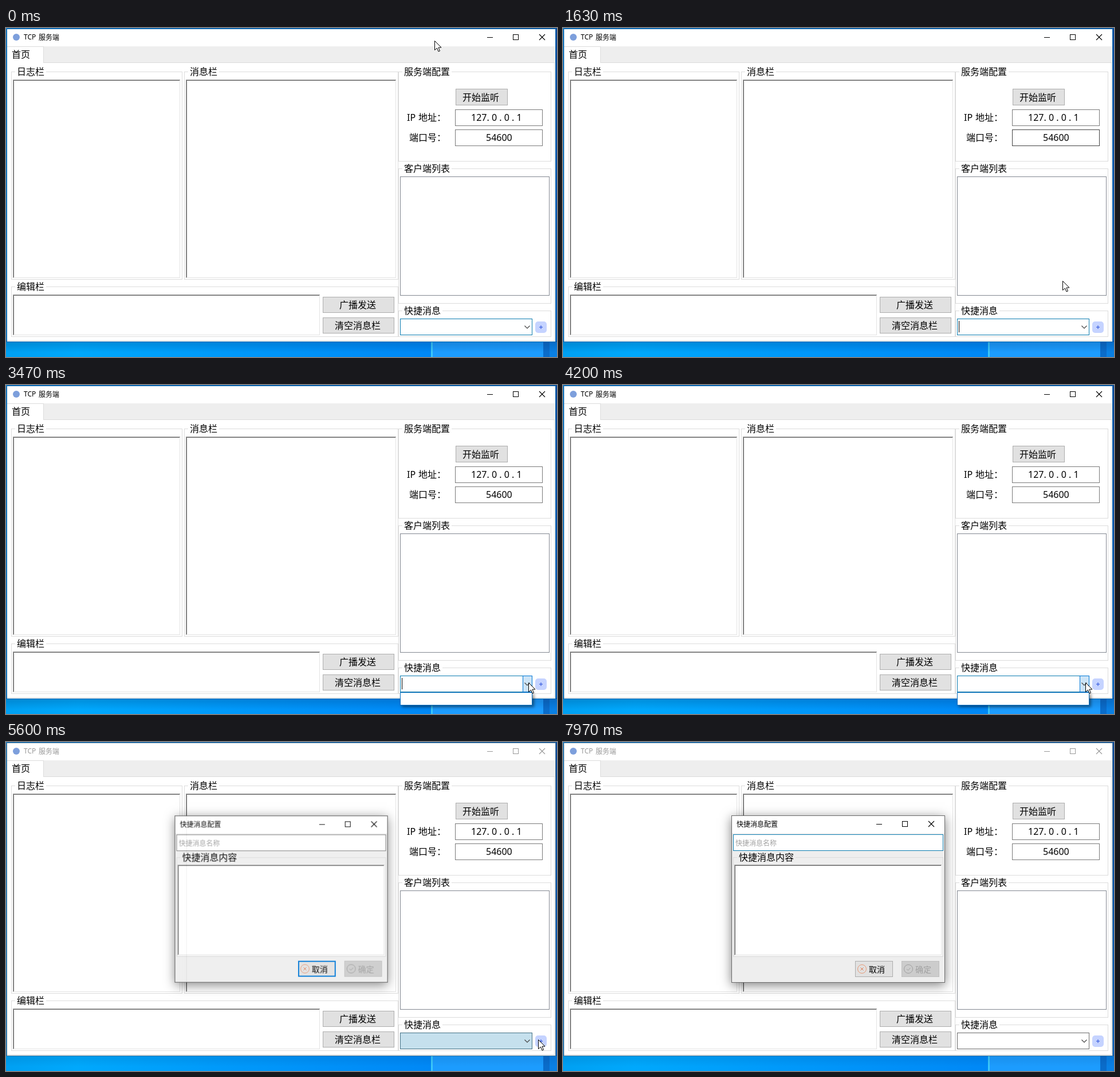
Recreate the animation shown at these times as an HTML page with a canvas. Size 962x574 px, loop 8000 ms.

```html
<!DOCTYPE html>
<html lang="zh-CN">
<head>
<meta charset="utf-8">
<title>TCP 服务端</title>
<style>
html, body { margin: 0; width: 100%; height: 100%; overflow: hidden; background: #fff; }
canvas { display: block; width: 100vw; height: 100vh; }
</style>
</head>
<body>
<canvas id="stage" width="962" height="574"></canvas>
<script>
const W = 962, H = 574, LOOP = 8000;
const FONT = '"Noto Sans", "Noto Sans CJK SC", "Noto Sans CJK", sans-serif';
const BLUE = '#0078d7', FOCUS = '#0b7cb0', LINE = '#dcdcdc';
const screen = document.getElementById('stage').getContext('2d');
const layer = document.createElement('canvas');
layer.width = W;
layer.height = H;
const layerCtx = layer.getContext('2d');
let c = screen;

// Key moments in ms
const DROP_OPEN = 2750, DROP_CLOSE = 4250, LEAVE_COMBO = 4800;
const INACTIVE = 5450, DIALOG = 5470, FIELD_CLICK = 7100;

// Pointer path: time, x, y
const PATH = [
  [0, 748, 22], [650, 748, 22], [1050, 772, 118], [1400, 848, 190],
  [1600, 872, 441], [1750, 872, 441], [2350, 912, 519], [4500, 912, 519],
  [4900, 928, 519], [5300, 929, 519], [5950, 929, 519], [6800, 608, 178],
  [LOOP, 608, 178]
];

const clamp = v => Math.max(0, Math.min(1, v));
const ease = v => v * v * (3 - 2 * v);
const mix = (a, b, k) => a + (b - a) * k;
const gray = v => `rgb(${v},${v},${v})`;

function pointer(t) {
  let i = 0;
  while (i < PATH.length - 2 && t >= PATH[i + 1][0]) i++;
  const [t0, x0, y0] = PATH[i], [t1, x1, y1] = PATH[i + 1];
  const k = ease(clamp((t - t0) / (t1 - t0)));
  return { x: Math.round(mix(x0, x1, k)), y: Math.round(mix(y0, y1, k)) };
}

const inside = (p, x, y, w, h) => p.x >= x && p.x < x + w && p.y >= y && p.y < y + h;

function fill(x, y, w, h, color) {
  c.fillStyle = color;
  c.fillRect(x, y, w, h);
}

function box(x, y, w, h, border, inner, thick = 1) {
  fill(x, y, w, h, border);
  fill(x + thick, y + thick, w - 2 * thick, h - 2 * thick, inner);
}

// Linear gradient from [offset, colour] stops
function blend(x0, y0, x1, y1, stops) {
  const g = c.createLinearGradient(x0, y0, x1, y1);
  stops.forEach(([at, color]) => g.addColorStop(at, color));
  return g;
}

// Text placed by the middle of its line
function text(s, x, mid, size = 16, color = '#000') {
  c.font = `${size}px ${FONT}`;
  c.fillStyle = color;
  c.fillText(s, x, Math.round(mid + size * 0.36));
}

function path(points, color, width = 1) {
  c.beginPath();
  points.forEach(([x, y]) => c.lineTo(x, y));
  c.strokeStyle = color;
  c.lineWidth = width;
  c.stroke();
}

function circle(x, y, r) {
  c.beginPath();
  c.arc(x, y, r, 0, 7);
}

function group(x, y, w, h, label, labelX, back = '#fff') {
  c.strokeStyle = LINE;
  c.lineWidth = 1;
  c.strokeRect(x + 0.5, y + 0.5, w - 1, h - 1);
  fill(labelX - 3, y, label.length * 16 + 6, 1, back);
  text(label, labelX, y + 0.5);
}

function sunken(x, y, w, h) {
  fill(x, y, w, h, '#fff');
  fill(x, y, w - 1, 1, '#a0a0a0');
  fill(x, y, 1, h - 1, '#a0a0a0');
  fill(x + 1, y + 1, w - 2, 1, '#696969');
  fill(x + 1, y + 1, 1, h - 2, '#696969');
  fill(x + 1, y + h - 2, w - 2, 1, '#e3e3e3');
  fill(x + w - 2, y + 1, 1, h - 2, '#e3e3e3');
}

function button(x, y, w, h, label, labelX) {
  box(x, y, w, h, '#adadad', '#e1e1e1');
  text(label, labelX, y + h / 2 + 0.5);
}

function captionButtons(x, y, color) {
  fill(x, y, 10, 1, color);
  c.strokeStyle = color;
  c.lineWidth = 1;
  c.strokeRect(x + 45.5, y - 4.5, 9, 9);
  path([[x + 91, y - 5], [x + 101, y + 5]], color, 1.1);
  path([[x + 101, y - 5], [x + 91, y + 5]], color, 1.1);
}

function desktop(active) {
  fill(0, 0, W, H, blend(0, 0, W, 0, [
    [0, '#00a0f2'], [0.13, '#00a8fc'], [0.4, '#0099fa'], [0.77, '#0088f6']
  ]));
  fill(0, 0, W, 3, blend(0, 0, W, 0, [[0, '#0a6ab8'], [1, '#084a94']]));
  fill(0, 0, 2, 548, '#1c7cc4');
  fill(744, 546, 194, 28, '#1c9cfe');
  fill(938, 546, 11, 28, '#0a6cca');
  fill(949, 546, 13, 28, '#0a80e4');
  fill(959, 0, 3, 548, blend(0, 0, 0, 548, [[0, '#0a4a9c'], [1, '#0a64c0']]));
  fill(742, 546, 3, 28, '#3cc8fa');
  fill(0, 546, W, 20, blend(0, 546, 0, 566, [
    [0, `rgba(0,20,60,${active ? 0.2 : 0.1})`], [1, 'rgba(0,20,60,0)']
  ]));
}

function combo(t, p, active) {
  box(688, 507, 231, 29, '#6a6a6a', '#fff');
  c.globalAlpha = clamp((INACTIVE + 250 - t) / 250);
  box(688, 507, 231, 29, FOCUS, '#fff');
  c.globalAlpha = 1;
  const over = active && inside(p, 902, 507, 17, 29);
  const glow = over ? 1 : active && t > LEAVE_COMBO - 200 ? clamp((5150 - t) / 350) : 0;
  if (glow) {
    c.globalAlpha = glow;
    box(902, 507, 17, 29, BLUE, over ? '#cce4f7' : '#f4f9fd');
    c.globalAlpha = 1;
  }
  path([[905.5, 519.5], [910, 524], [914.5, 519.5]], '#444', 1.2);
  if (active && t >= 250 && (t - 250) % 1060 < 530) fill(691, 511, 1, 20, '#000');
}

function plusButton(t, p) {
  const hover = t < INACTIVE && inside(p, 924, 512, 20, 20);
  c.beginPath();
  c.roundRect(924, 512, 20, 20, 5);
  c.fillStyle = hover ? '#8298ee' : '#c5d3ff';
  c.fill();
  fill(931, 521.25, 6, 1.5, '#5272e4');
  fill(933.25, 519, 1.5, 6, '#5272e4');
}

function dropdown() {
  c.save();
  c.shadowColor = 'rgba(0,0,0,.45)';
  c.shadowBlur = 5;
  c.shadowOffsetX = c.shadowOffsetY = 3;
  fill(688, 536, 231, 23, '#fff');
  c.restore();
  box(688, 536, 231, 23, '#0a70c0', '#fff');
}

function mainWindow(t, p) {
  const active = t < INACTIVE;
  const ink = active ? '#000' : '#999';
  desktop(active);
  box(1, 1, 959, 547, active ? '#0a68b0' : '#4a7896', '#fff');

  circle(18, 16, 6);
  c.fillStyle = '#7d9fdc';
  c.fill();
  text('TCP', 31, 16, 12, ink);
  text('服务端', 57, 16.5, 12, ink);
  captionButtons(840, 16, ink);

  fill(2, 32, 957, 29, '#eee');
  fill(2, 32, 64, 29, '#fff');
  fill(2, 32, 64, 1, LINE);
  fill(65, 32, 1, 29, LINE);
  fill(66, 60, 892, 1, LINE);
  fill(957, 60, 1, 486, LINE);
  fill(2, 545, 956, 1, LINE);
  text('首页', 10, 46);

  group(9, 76, 299, 363, '日志栏', 19);
  sunken(12, 90, 293, 347);
  group(311, 76, 374, 363, '消息栏', 321);
  sunken(314, 90, 368, 347);
  group(9, 451, 676, 88, '编辑栏', 19);
  sunken(12, 465, 537, 72);
  button(553, 469, 125, 28, '广播发送', 582);
  button(553, 505, 125, 28, '清空消息栏', 574);

  group(685, 76, 267, 157, '服务端配置', 695);
  button(785, 106, 91, 29, '开始监听', 797);
  const ipHover = inside(p, 784, 142, 153, 29);
  const portHover = inside(p, 784, 177, 153, 29);
  const fade = t > 1350 && t < 2000 ? clamp((1900 - t) / 400) : 0;
  box(784, 142, 153, 29, ipHover ? '#333' : '#7a7a7a', '#fff');
  box(784, 177, 153, 29, portHover ? '#222' : gray(Math.round(mix(122, 40, fade))), '#fff');
  text('IP', 700, 156.5);
  text('地址：', 720, 156.5);
  text('端口号：', 704, 191.5);
  text('127. 0 . 0 . 1', 812, 156.5);
  text('54600', 838, 191.5);

  group(685, 245, 267, 236, '客户端列表', 695);
  box(688, 259, 261, 208, '#828790', '#fff');
  group(685, 493, 267, 46, '快捷消息', 695);
  combo(t, p, active);
  plusButton(t, p);
  if (t >= DROP_OPEN && t < DROP_CLOSE) dropdown();
}

function dialogBody(t, p) {
  const focused = t >= FIELD_CLICK;
  const hover = inside(p, 297, 161, 367, 29);
  box(294, 128, 373, 292, '#6a6a6a', '#eee');
  fill(295, 129, 371, 30, '#fff');
  text('快捷消息配置', 303, 143.5, 12);
  captionButtons(547, 143, '#000');

  box(297, 161, 367, 29, focused ? FOCUS : hover ? '#111' : '#7a7a7a', '#fff');
  text('快捷消息名称', 301, 177, 12, '#a0a0a0');
  if (focused && (t - FIELD_CLICK) % 1060 < 530) fill(300, 169, 1, 16, '#000');

  group(297, 201, 367, 174, '快捷消息内容', 307, '#eee');
  sunken(299, 214, 363, 159);

  box(510, 382, 66, 28, focused ? '#adadad' : BLUE, '#e1e1e1', focused ? 1 : 2);
  c.lineWidth = 1;
  c.strokeStyle = '#e89a78';
  circle(522, 396, 7.5);
  c.stroke();
  path([[519.5, 393.5], [524.5, 398.5]], '#e07a50');
  path([[524.5, 393.5], [519.5, 398.5]], '#e07a50');
  text('取消', 534, 397, 14);

  box(591, 382, 66, 28, '#bfbfbf', '#ccc');
  c.strokeStyle = '#a0a0a0';
  circle(603, 396, 7.5);
  c.stroke();
  path([[600, 396], [602.5, 398.5], [606.5, 394]], '#a0a0a0');
  text('确定', 615, 397, 14, '#a0a0a0');
}

// Shadow kept outside the dialog so it never shows through while fading in
function dialogShadow() {
  c.save();
  c.beginPath();
  c.rect(200, 50, 560, 450);
  c.rect(294, 128, 373, 292);
  c.clip('evenodd');
  c.shadowColor = 'rgba(0,0,0,.5)';
  c.shadowBlur = 18;
  c.shadowOffsetY = 4;
  fill(294, 128, 373, 292, '#000');
  c.restore();
}

function dialog(t, p) {
  c = layerCtx;
  c.clearRect(0, 0, W, H);
  dialogBody(t, p);
  c = screen;
  const k = clamp((t - DIALOG) / 190);
  const scale = 1 - 0.1 * (1 - k) ** 3;
  c.save();
  c.globalAlpha = 1 - (1 - k) ** 2.3;
  c.translate(480.5, 274);
  c.scale(scale, scale);
  c.translate(-480.5, -274);
  dialogShadow();
  c.drawImage(layer, 0, 0);
  c.restore();
}

function cursor(t, p) {
  const open = t >= DIALOG;
  const overDialog = open && inside(p, 294, 128, 373, 292);
  const beam = overDialog
    ? inside(p, 297, 161, 367, 29) || inside(p, 299, 214, 363, 159)
    : !open && (inside(p, 784, 142, 153, 29) || inside(p, 784, 177, 153, 29) ||
      inside(p, 688, 507, 214, 29));
  if (beam) {
    if (t >= FIELD_CLICK) return;
    fill(p.x, p.y - 7, 1, 15, '#ededed');
    fill(p.x - 3, p.y - 8, 7, 1, '#f2f2f2');
    fill(p.x - 3, p.y + 8, 7, 1, '#f2f2f2');
    return;
  }
  c.beginPath();
  [[0, 0], [0, 16], [4, 12.5], [6.5, 18.5], [9, 17.5], [6.5, 11.5], [11.5, 11.5]]
    .forEach(([x, y]) => c.lineTo(p.x + x + 0.5, p.y + y + 0.5));
  c.closePath();
  c.fillStyle = '#fff';
  c.fill();
  c.strokeStyle = '#000';
  c.lineWidth = 1;
  c.stroke();
}

function draw(t) {
  const p = pointer(t);
  mainWindow(t, p);
  if (t >= DIALOG) dialog(t, p);
  cursor(t, p);
}

const start = performance.now();
function tick() {
  draw((performance.now() - start) % LOOP);
  requestAnimationFrame(tick);
}
tick();
</script>
</body>
</html>
```
